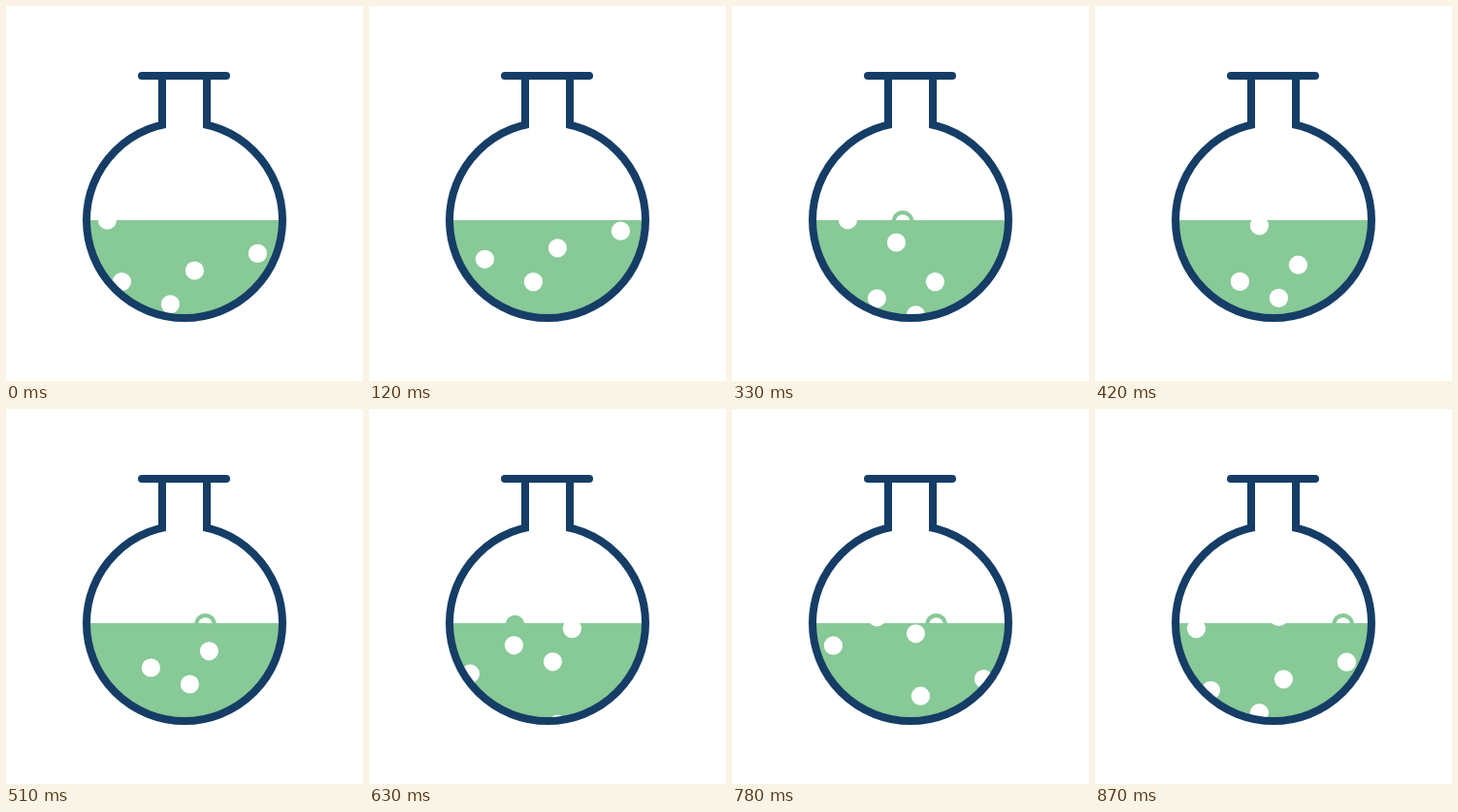
An HTML page with a canvas that plays this animation: 368x387 px, repeating every 0.9 s.

```html
<!DOCTYPE html>
<html lang="en">
<head>
<meta charset="utf-8">
<title>Bubbling flask</title>
<style>
  html, body { margin: 0; width: 100%; height: 100%; overflow: hidden; background: #fff; }
  canvas { display: block; }
</style>
</head>
<body>
<canvas id="stage" width="368" height="387"></canvas>
<script>
const ctx = document.getElementById('stage').getContext('2d');
const LOOP = 900;
const GREEN = '#87c997', NAVY = '#153d66', WHITE = '#fff';
const flask = { x: 184, y: 221, r: 101, neck: 23, top: 72, line: 8 };

// Rising bubbles: x and height at the start of the loop
const RISE = 174, EXIT = 211, BUBBLE_R = 9.6;
const bubbles = [
  [104.4, 221.2], [119.4, 284.7], [149.4, 365.8], [169.4, 308],
  [189.4, 382.8], [194.4, 273.2], [209.4, 348.6], [259.4, 255.6]
];

// Bubbles bursting at the surface: x and start time
const POP_R = 11.4;
const pops = [[108, 120], [176, 240], [205.5, 420], [150.5, 580], [210.5, 690], [255.7, 780]];

const mod = (a, n) => ((a % n) + n) % n;
const ramp = (t, from, to) => Math.min(1, Math.max(0, (t - from) / (to - from)));

function disc(x, y, r, color) {
  ctx.fillStyle = color;
  ctx.beginPath();
  ctx.arc(x, y, r, 0, Math.PI * 2);
  ctx.fill();
}

function line(x1, y1, x2, y2, cap) {
  ctx.lineCap = cap;
  ctx.beginPath();
  ctx.moveTo(x1, y1);
  ctx.lineTo(x2, y2);
  ctx.stroke();
}

function drawLiquid(t) {
  ctx.save();
  ctx.fillStyle = GREEN;
  ctx.beginPath();
  ctx.arc(flask.x, flask.y, flask.r, 0, Math.PI);
  ctx.closePath();
  ctx.fill();
  ctx.clip();
  for (const [x, y] of bubbles) {
    disc(x, EXIT + mod(y - EXIT - RISE * t / LOOP, RISE), BUBBLE_R, WHITE);
  }
  ctx.restore();
}

function drawPops(t) {
  ctx.save();
  ctx.beginPath();
  ctx.rect(0, 0, 368, flask.y);
  ctx.clip();
  for (const [x, start] of pops) {
    const age = t - start;
    const hole = ramp(age, 55, 112);
    if (age <= 0 || hole === 1) continue;
    disc(x, flask.y + 1.4, POP_R * ramp(age, 0, 60), GREEN);
    disc(x, flask.y + 1.4, POP_R * hole, WHITE);
  }
  ctx.restore();
}

function drawFlask() {
  const { x, y, r, neck, top } = flask;
  const gap = neck - flask.line / 2;
  const joint = y - Math.sqrt(r * r - neck * neck);
  ctx.strokeStyle = NAVY;
  ctx.lineWidth = flask.line;
  ctx.beginPath();
  ctx.arc(x, y, r, 0, Math.PI * 2);
  ctx.stroke();
  ctx.fillStyle = WHITE;
  ctx.fillRect(x - gap, top, gap * 2, 60);
  line(x - neck, top, x - neck, joint, 'butt');
  line(x + neck, top, x + neck, joint, 'butt');
  line(x - 44, top, x + 43, top, 'round');
}

function frame(now) {
  const t = mod(now - begin, LOOP);
  ctx.fillStyle = WHITE;
  ctx.fillRect(0, 0, 368, 387);
  drawLiquid(t);
  drawPops(t);
  drawFlask();
  requestAnimationFrame(frame);
}

const begin = performance.now();
frame(begin);
</script>
</body>
</html>
```
